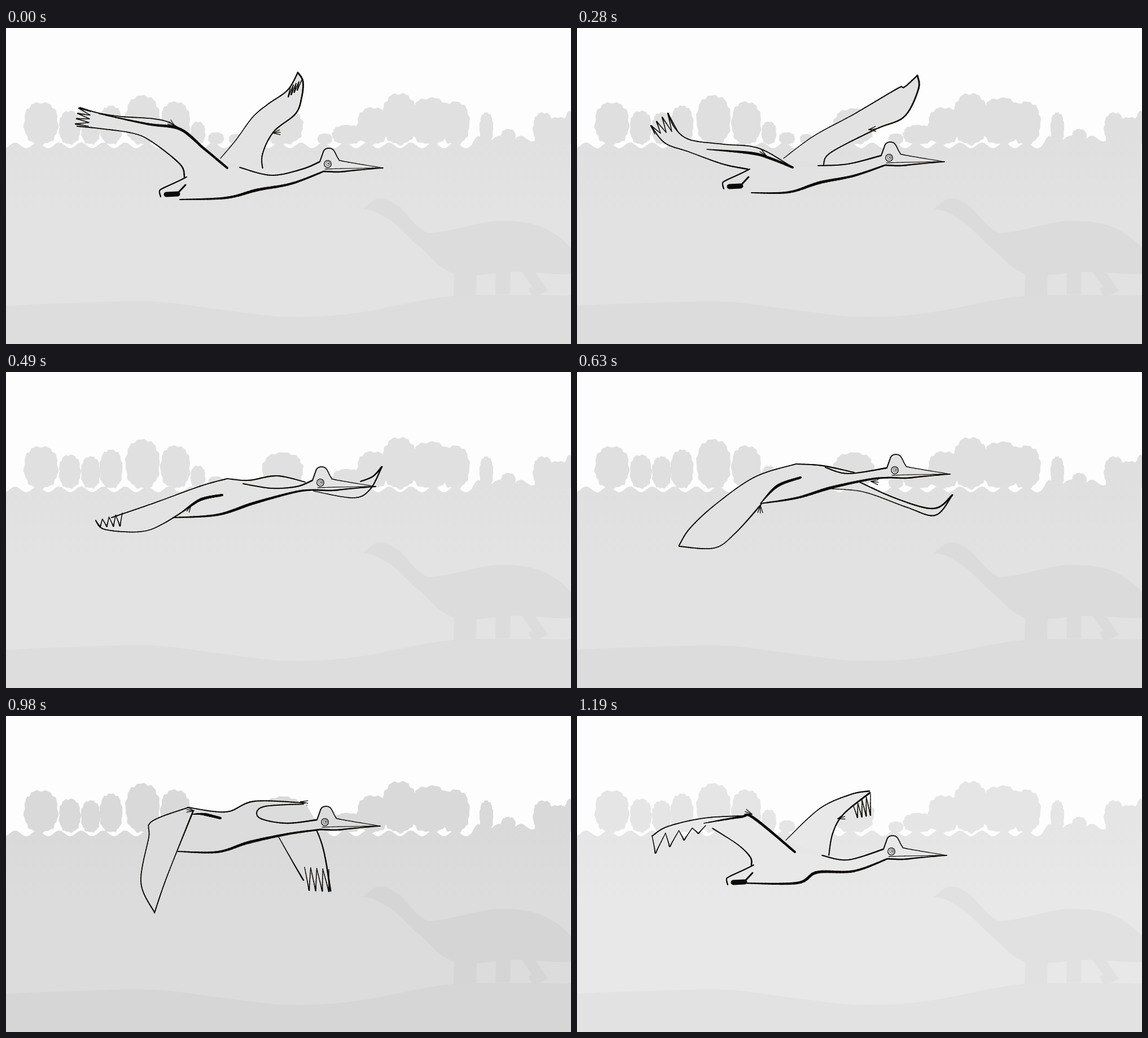
Animation, 1001 px wide and 560 px high, one loop 1260 ms. Source, as an HTML page with a canvas:

```html
<!DOCTYPE html>
<html lang="en">
<head>
<meta charset="utf-8">
<title>Flying pterosaur</title>
<style>
html, body { margin: 0; width: 100%; height: 100%; overflow: hidden; background: #fdfdfd; }
canvas { display: block; }
</style>
</head>
<body>
<canvas id="stage" width="1001" height="560"></canvas>
<script>
const ctx = document.getElementById('stage').getContext('2d');
const STEP = 70, STEPS = 18, N = 44, INK = '#0d0b08';

// Pen width of each line at its start, middle and end.
const PEN = {
  fl: [1.3, 1.7, 2.4], ft: [3, 2.2, 2], nl: [2, 1.7, 2], nt: [2, 1.6, 2.6],
  ar: [1.5, 4.8, 4], bk: [1.8, 2.3, 1.8], nk: [2, 2, 2.6], be: [2, 5, 2.8]
};

// Key poses of the wing beat, as x, y points for splines.
// fl/ft: far wing out and back; nl/nt: near wing out and back; ar: upper arm;
// bk: back; nk: neck; be: belly. Hands: finger roots a-b, then tips a-b. Claws: x, y, angle.
const poses = [
  { at: 0, tone: 224, eye: [570, 241],
    fl: [380,231, 407,199, 437,158, 464,135, 499,110, 517,79],
    ft: [517,79, 526,94, 524,122, 513,152, 474,184, 454,225, 456,256],
    nl: [392,248, 350,213, 298,172, 262,161, 205,157, 165,151, 131,141],
    nt: [126,174, 165,178, 227,187, 262,204, 309,242, 316,264],
    ar: [165,152, 250,170, 308,179, 350,213, 392,248],
    nk: [414,247, 470,261, 525,250],
    be: [308,304, 390,301, 445,287, 505,276],
    farHand: [504,104, 524,92, 500,122, 516,110], nearHand: [150,148, 146,174, 129,142, 123,170],
    farClaw: [473,186, -.1], nearClaw: [299,174, 3.8] },

  { at: 4, tone: 223, eye: [553, 230],
    fl: [366,231, 420,191, 490,153, 570,106, 580,105, 603,84],
    ft: [603,84, 605,108, 580,157, 530,179, 449,221, 437,243],
    nl: [382,247, 322,213, 260,206, 200,198, 174,178, 161,151],
    nt: [131,173, 156,204, 197,219, 258,241, 302,250],
    ar: [230,215, 310,222, 345,232, 382,247],
    nk: [427,244, 480,241],
    be: [309,292, 375,291, 430,274, 490,262],
    farHand: [603,84, 603,84, 603,84, 603,84], nearHand: [178,182, 138,188, 161,151, 131,173],
    farClaw: [517,180, -.1], nearClaw: [335,226, 3.7] },

  { at: 7, tone: 224, eye: [557, 196],
    fl: [545,211, 615,223, 645,208, 666,168],
    ft: [666,168, 650,185, 628,194],
    nl: [392,189, 345,202, 260,233, 187,258],
    nt: [159,263, 175,279, 238,283, 280,268, 345,226],
    ar: [313,247, 345,226, 383,218],
    bk: [392,189, 430,192, 480,184, 530,195],
    nk: [420,198, 470,206, 515,203],
    be: [296,258, 375,253, 440,232, 515,212],
    farHand: [666,168, 666,168, 666,168, 666,168], nearHand: [159,264, 206,250, 167,274, 202,273],
    farClaw: [500,205, 0], nearClaw: [328,236, 2.2] },

  { at: 9, tone: 223, eye: [563, 174],
    fl: [452,207, 510,213, 585,240, 635,254, 665,218],
    ft: [665,218, 632,242, 565,224, 490,190],
    nl: [388,163, 315,186, 245,235, 200,277, 181,307],
    nt: [181,309, 243,312, 280,286, 326,235],
    ar: [325,233, 355,202, 396,187],
    bk: [388,163, 435,166, 491,178],
    nk: [440,169, 480,180],
    be: [326,233, 390,223, 450,205, 520,190],
    farHand: [665,218, 665,218, 665,218, 665,218], nearHand: [181,308, 181,308, 181,308, 181,308],
    farClaw: [521,194, .1], nearClaw: [325,237, 1.6] },

  { at: 12, tone: 213, eye: [563, 153],
    fl: [422,188, 485,225, 515,265, 552,304],
    ft: [603,308, 578,280, 552,222, 523,176],
    nl: [345,149, 300,160, 263,181, 249,262, 253,335, 262,368],
    nt: [263,368, 300,315, 313,250, 329,190],
    ar: [330,185, 345,162, 378,157],
    bk: [345,149, 400,132, 465,142, 497,155],
    nk: [440,149, 470,155, 505,155],
    be: [327,205, 390,203, 435,177, 500,169],
    farHand: [550,289, 588,290, 563,326, 602,309], nearHand: [262,368, 262,368, 262,368, 262,368],
    farClaw: [524,173, .5], nearClaw: [331,184, 1.5] },

  { at: 14, tone: 217, eye: [565, 188],
    fl: [480,209, 510,262, 527,291],
    ft: [575,310, 560,228, 530,160],
    nl: [323,162, 258,187, 253,215, 239,295, 263,348],
    nt: [263,349, 285,285, 331,170],
    ar: [331,174, 350,174, 380,181],
    bk: [323,162, 390,170, 440,151, 530,154],
    nk: [527,156, 455,161, 448,180, 495,190],
    be: [305,240, 375,241, 430,224, 500,209],
    farHand: [529,268, 572,272, 537,309, 572,311], nearHand: [263,348, 263,348, 263,348, 263,348],
    farClaw: [522,152, .2], nearClaw: [333,168, 3.3] },

  { at: 17, tone: 229, eye: [557, 240],
    fl: [370,220, 430,164, 485,139, 518,133],
    ft: [519,136, 472,174, 453,208, 446,248],
    nl: [386,241, 312,180, 298,177, 225,181, 160,196, 133,213],
    nt: [240,199, 285,228, 307,250, 309,264],
    ar: [225,190, 290,179, 312,180, 386,241],
    nk: [434,247, 480,255],
    be: [290,296, 390,296, 425,277, 490,275],
    farHand: [490,160, 520,138, 497,180, 520,176], nearHand: [133,212, 228,194, 139,243, 215,208],
    farClaw: [462,182, -.3], nearClaw: [310,174, 3.5] }
];

const mix = (a, b, k) => a + (b - a) * k;
const blend = (a, b, k) => a.map((v, i) => mix(v, b[i], k));
const shift = (pts, [dx, dy]) => pts.map(([x, y]) => [x + dx, y + dy]);

function pairs(list) {
  const out = [];
  for (let i = 0; i < list.length; i += 2) out.push([list[i], list[i + 1]]);
  return out;
}

function spline(pts, sub = 10) {
  const out = [];
  for (let i = 0; i < pts.length - 1; i++) {
    const a = pts[Math.max(i - 1, 0)], b = pts[i], c = pts[i + 1], d = pts[Math.min(i + 2, pts.length - 1)];
    for (let j = 0; j < sub; j++) {
      const t = j / sub;
      out.push([0, 1].map(k => b[k] + .5 * t * (c[k] - a[k] +
        t * (2 * a[k] - 5 * b[k] + 4 * c[k] - d[k] + t * (3 * (b[k] - c[k]) + d[k] - a[k])))));
    }
  }
  out.push(pts[pts.length - 1]);
  return out;
}

// N samples spaced evenly along a smooth curve, so that poses can blend.
function even(pts) {
  const fine = spline(pts), len = [0], out = [];
  for (let i = 1; i < fine.length; i++)
    len.push(len[i - 1] + Math.hypot(fine[i][0] - fine[i - 1][0], fine[i][1] - fine[i - 1][1]));
  for (let i = 0, j = 0; i < N; i++) {
    const s = len[len.length - 1] * i / (N - 1);
    while (j < len.length - 2 && len[j + 1] < s) j++;
    out.push(blend(fine[j], fine[j + 1], (s - len[j]) / (len[j + 1] - len[j] || 1)));
  }
  return out;
}

// Shared shapes: the head around the eye, the leg behind the near wing.
const NAPE = [-14, -4], THROAT = [-7, 13];
const crest = even([NAPE, ...pairs([-9,-18, -6,-25, 1,-28, 10,-25, 19,-9, 27,-5, 98,7])]);
const jaw = even([...pairs([98,7, 50,11, 20,14]), THROAT]);
const mouth = even(pairs([-5,9, 30,8, 98,7]));
const leg = even(pairs([4,0, -12,8, -38,20, -44,25, -42,35]));
const sole = pairs([-32,31, -12,30]), shin = pairs([-12,29, 2,14]);

for (const p of poses) {
  p.bk ??= [...p.nl.slice(0, 2), ...p.nk.slice(0, 2)];
  for (const k in PEN) p[k] = pairs(p[k]);
  p.nk.push(...shift([NAPE], p.eye));
  p.be.push(...shift([THROAT], p.eye));
  for (const k in PEN) p[k] = even(p[k]);
}

function ink(pts, w) {
  for (let i = 1; i < pts.length; i++) {
    const u = 2 * (i - .5) / (pts.length - 1);
    ctx.lineWidth = u < 1 ? mix(w[0], w[1], u) : mix(w[1], w[2], u - 1);
    ctx.beginPath();
    ctx.moveTo(...pts[i - 1]);
    ctx.lineTo(...pts[i]);
    ctx.stroke();
  }
}

function fill(pts, color) {
  ctx.fillStyle = color;
  ctx.beginPath();
  pts.forEach(p => ctx.lineTo(...p));
  ctx.fill();
}

function ring(x, y, r, w) {
  ctx.lineWidth = w;
  ctx.beginPath();
  ctx.arc(x, y, r, 0, 7);
  ctx.stroke();
}

// Four fingers, spread from the root line to the tip line.
function hand(spec) {
  const [a, b, c, d] = pairs(spec);
  for (let i = 0; i < 4; i++) {
    const left = blend(a, b, i / 4), right = blend(a, b, (i + 1) / 4), tip = blend(c, d, i / 3);
    const side = root => blend(root, blend(tip, root, .15), .85);
    ink(spline([left, side(left), tip, side(right), right], 5), [1.3, 2, 1.3]);
  }
}

function claws([x, y, angle]) {
  for (const turn of [-.35, 0, .35])
    ink([[x, y], [x + 13 * Math.cos(angle + turn), y + 13 * Math.sin(angle + turn)]], [1.2, 1.3, 1]);
}

// Scenery: each tree is x, top, half width.
const BASE = 206;
const trees = [
  [62,132,30], [113,147,19], [150,150,17], [186,138,20], [242,120,30], [300,131,26], [340,166,13],
  [372,185,14], [406,188,11], [490,143,36], [565,187,13], [605,172,27], [650,141,28], [697,116,30],
  [752,124,37], [795,131,26], [851,150,12], [890,179,13], [952,150,18], [978,158,20], [1003,146,14]
];
const woods = new Path2D(), field = new Path2D();
trees.forEach(([x, top, rx], n) => {
  const ry = (BASE - top) / 2;
  const round = v => Math.sign(v) * Math.abs(v) ** .85;
  for (let s = 0; s <= 90; s++) {
    const a = s * Math.PI / 45;
    const r = 1 + .03 * Math.sin(9 * a + n) + .025 * Math.sin(17 * a + 2 * n);
    woods[s ? 'lineTo' : 'moveTo'](x + rx * r * round(Math.cos(a)), top + ry + ry * r * round(Math.sin(a)));
  }
  woods.closePath();
});
for (let x = 0; x <= 1001; x += 2)
  field.lineTo(x, BASE + 2 + 5 * Math.sin((x - 65) / 6.2) - Math.min(12, Math.max(0, x - 824)));
field.lineTo(1001, 560);
field.lineTo(0, 560);

const ground = [...spline(pairs([0,492, 100,488, 260,485, 380,499, 500,512, 620,505, 765,478, 860,473, 1001,474])), [1001, 560], [0, 560]];
const sauropod = spline(pairs([632,321, 660,302, 693,314, 735,356, 765,362, 870,342, 950,353, 1005,395,
  1005,434, 905,432, 797,436, 735,390, 690,348, 655,326, 632,321]));

function limb(color, width, ...pts) {
  ctx.strokeStyle = color;
  ctx.lineWidth = width;
  ctx.beginPath();
  pairs(pts).forEach(p => ctx.lineTo(...p));
  ctx.stroke();
}

const gray = v => `rgb(${v},${v},${v - .5})`;

function scenery(tone) {
  ctx.fillStyle = '#fdfdfd';
  ctx.fillRect(0, 0, 1001, 560);
  const haze = ctx.createLinearGradient(0, 190, 0, 330);
  haze.addColorStop(0, gray(tone));
  haze.addColorStop(1, gray(tone + 3));
  ctx.fillStyle = haze;
  ctx.fill(woods);
  ctx.fill(field);
  fill(ground, gray(tone - 3));
  const body = gray(tone - 4);
  fill(sauropod, body);
  ctx.lineCap = 'butt';
  ctx.lineJoin = 'miter';
  limb(body, 40, 814,425, 813,476);
  limb(body, 26, 881,425, 880,472);
  limb(body, 19, 920,425, 946,462, 930,470);
}

function bird(p, paper) {
  const draw = (...keys) => keys.forEach(k => ink(p[k], PEN[k]));
  const hip = p.nt[N - 1], raised = p.nl[N - 1][1] < hip[1];
  const belly = [...p.be].reverse();
  ctx.strokeStyle = INK;
  ctx.lineCap = ctx.lineJoin = 'round';

  fill([...p.fl, ...p.ft], paper);
  draw('fl', 'ft');
  hand(p.farHand);
  claws(p.farClaw);

  fill([...p.bk, ...p.nk, ...belly], paper);
  fill([...p.bk, ...belly], paper);
  fill([...p.nl, ...p.nt, ...p.be.slice(0, N / 2)], paper);
  draw('nk', 'be', 'nl', 'nt', 'ar');
  hand(p.nearHand);
  claws(p.nearClaw);

  // The leg shows only under a raised wing.
  if (raised) {
    ink(shift(leg, hip), [2, 2, 2.2]);
    ink(shift(sole, hip), [9, 9, 9]);
    ink(shift(shin, hip), [3, 3, 3]);
  } else {
    draw('bk');
  }

  fill(shift([...crest, ...jaw], p.eye), paper);
  ink(shift(crest, p.eye), [2, 1.4, 1]);
  ink(shift(jaw, p.eye), [1.4, 2.2, 2.6]);
  ink(shift(mouth, p.eye), [1.2, .9, 1.6]);
  const [x, y] = p.eye;
  ring(x, y, 6.3, 1.3);
  ring(x + .5, y - .5, 3.6, .7);
  ring(x + 1, y - .5, 1, .9);
}

function poseAt(step) {
  let i = poses.length - 1;
  while (poses[i].at > step) i--;
  const a = poses[i], b = poses[(i + 1) % poses.length], p = {};
  const k = (step - a.at) / ((b.at || STEPS) - a.at);
  p.tone = mix(a.tone, b.tone, k);
  for (const n of ['eye', 'farHand', 'nearHand', 'farClaw', 'nearClaw']) p[n] = blend(a[n], b[n], k);
  for (const n in PEN) p[n] = a[n].map((q, j) => blend(q, b[n][j], k));
  return p;
}

function frame(time) {
  const p = poseAt(Math.floor(time / STEP) % STEPS);
  scenery(p.tone);
  bird(p, gray(p.tone + 3));
}

let start;
function tick(now) {
  start ??= now;
  frame(Math.max(0, now - start));
  requestAnimationFrame(tick);
}
frame(0);
requestAnimationFrame(tick);
</script>
</body>
</html>
```
